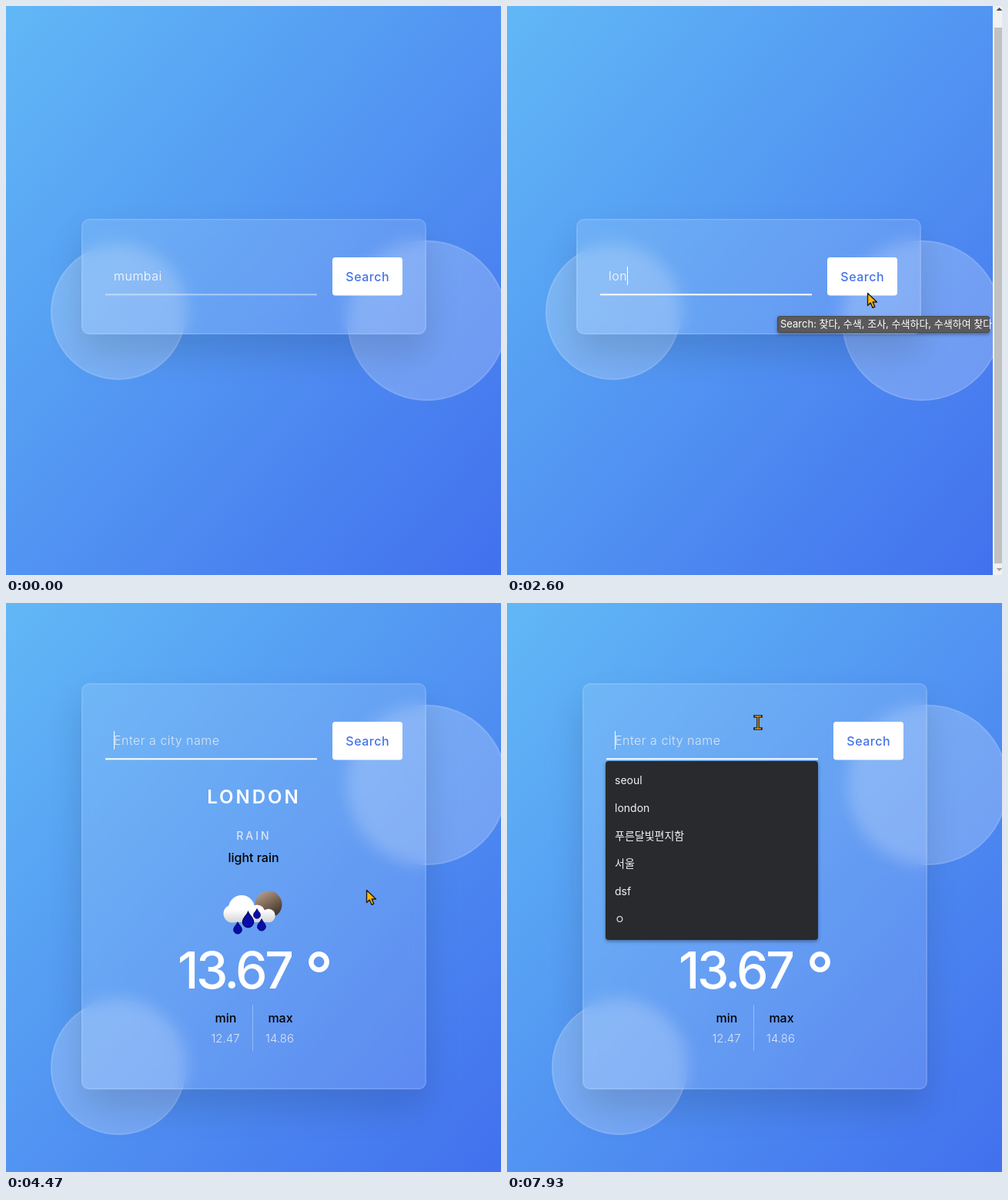
Write an HTML page that moves like this. It is 643 by 738 pixels and loops after 8 s.

```html
<!DOCTYPE html>
<html lang="en">
<head>
<meta charset="utf-8">
<title>Weather search</title>
<style>
  html, body { margin: 0; width: 100%; height: 100%; overflow: hidden; }
  body { font: 16px Inter, "Noto Sans CJK KR", "Noto Sans CJK", sans-serif; }
  #stage {
    position: relative; width: 643px; height: 738px; overflow: hidden;
    background: linear-gradient(to right bottom, #61b8f6, #4270ee);
  }
  #card { position: absolute; width: 448px; }
  .circle, #glass {
    position: absolute; box-sizing: border-box;
    border: 2px solid rgba(255, 255, 255, .1);
  }
  .circle { border-radius: 50%; background: rgba(255, 255, 255, .22); }
  #small { width: 176px; height: 176px; left: -40px; bottom: -59px; }
  #large { width: 208px; height: 208px; left: 345px; top: 28px; }
  #glass {
    inset: 0; border-radius: 10px;
    background: rgba(255, 255, 255, .12);
    backdrop-filter: blur(10px);
    box-shadow: 0 25px 45px rgba(0, 0, 0, .13);
  }
  svg { position: absolute; width: 643px; height: 738px; overflow: visible; }
  #content { left: -98px; top: -104px; }
  #overlay { left: 0; top: 0; }
  text { fill: #fff; white-space: pre; }
  .mid { text-anchor: middle; }
  .field { font-weight: 300; letter-spacing: .5px; }
  .pale { fill: #dce6f5; }
  .button { font-weight: 500; letter-spacing: .5px; fill: #4573e8; }
  .city { font-size: 24px; font-weight: 600; letter-spacing: 3px; }
  .kind { font-size: 14px; font-weight: 500; letter-spacing: 3px; }
  .dark { fill: #000; font-weight: 500; }
  .degrees { font-size: 66px; font-weight: 500; letter-spacing: -3.5px; }
  .ring { font-size: 80px; font-weight: 500; }
  .limit { font-size: 15px; font-weight: 300; }
  .tip { font-size: 13px; }
  .option { font-size: 14px; fill: #f1f2f4; }
  .shadow { filter: drop-shadow(0 2px 2px rgba(0, 0, 0, .35)); }
</style>
</head>
<body>
<div id="stage">
  <div id="card">
    <div class="circle" id="small"></div>
    <div class="circle" id="large"></div>
    <div id="glass"></div>
    <svg id="content">
      <defs>
        <linearGradient id="sun" x1="0" y1="0" x2=".6" y2="1">
          <stop stop-color="#c0ad9c"/><stop offset=".5" stop-color="#836d5b"/><stop offset="1" stop-color="#40342c"/>
        </linearGradient>
        <linearGradient id="cloud" gradientUnits="userSpaceOnUse" x1="0" y1="380" x2="0" y2="415">
          <stop offset=".5" stop-color="#fff"/><stop offset="1" stop-color="#d2d2d4"/>
        </linearGradient>
        <path id="drop" d="M0-8C1.5-4 6-1 6 3A6 6 0 0 1-6 3C-6-1-1.5-4 0-8Z" fill="#0a0caa" stroke="#04055c"/>
      </defs>
      <rect id="selection" y="166" height="24" fill="#3390ff"/>
      <text id="placeholder" class="field pale" x="140" y="183.5">Enter a city name</text>
      <text id="value" class="field" x="140" y="183.5"></text>
      <rect id="caret" y="166" width="1" height="24" fill="#fff"/>
      <rect id="underline" x="129" y="201.3" width="275" height="2" fill="#fff"/>
      <rect x="424" y="154" width="91" height="49.5" rx="4" fill="#fff"/>
      <text class="button mid" x="469.7" y="184.5">Search</text>
      <g id="weather">
        <text class="city mid" x="322" y="260">LONDON</text>
        <text class="kind pale mid" x="322" y="307">RAIN</text>
        <text class="dark mid" x="321.5" y="335.5">light rain</text>
        <circle cx="341" cy="391" r="17.5" fill="url(#sun)"/>
        <g fill="url(#cloud)">
          <circle cx="306" cy="396" r="17"/><circle cx="294" cy="403" r="11.5"/>
          <circle cx="326" cy="402" r="10.5"/><circle cx="341" cy="405.5" r="8.7"/>
          <rect x="286" y="401" width="62" height="13" rx="6"/>
        </g>
        <use href="#drop" transform="translate(301 421) scale(.9)"/>
        <use href="#drop" transform="translate(314.500 410) scale(1.2)"/>
        <use href="#drop" transform="translate(326 402.500) scale(.75)"/>
        <use href="#drop" transform="translate(332 417) scale(.9)"/>
        <text class="degrees" x="223" y="500">13.67</text>
        <text class="ring mid" x="406.5" y="511">°</text>
        <text class="dark mid" x="285.5" y="544">min</text>
        <text class="dark mid" x="356.5" y="544">max</text>
        <text class="limit pale mid" x="285" y="569.5">12.47</text>
        <text class="limit pale mid" x="355.5" y="569.5">14.86</text>
        <rect x="320" y="521" width="1" height="60" fill="#fff" opacity=".35"/>
      </g>
    </svg>
  </div>
  <svg id="overlay">
    <g id="tooltip">
      <rect class="shadow" x="351.5" y="402.500" width="275" height="21" rx="2.5" fill="#5a5a5c" stroke="#48494c"/>
      <text class="tip" x="355" y="417">Search: 찾다, 수색, 조사, 수색하다, 수색하여 찾다</text>
    </g>
    <g id="dropdown">
      <rect class="shadow" x="128" y="205" width="276" height="232" rx="4" fill="#292a2d"/>
    </g>
    <g id="scrollbar">
      <rect x="631" width="12" height="738" fill="#f1f1f1"/>
      <rect x="633" y="28" width="10" height="695" fill="#c1c1c1"/>
      <path d="M635.500 6 639.500 2 643.500 6Z" fill="#505050"/>
      <path d="M635.500 729 639.500 733 643.500 729Z" fill="#a3a3a3"/>
    </g>
    <path id="arrow" d="M.5.5V16.500L4.200 13 7 19.300 9.800 18 7.200 12H12.500Z" fill="#ffb60a" stroke="#1f1c1a" stroke-width="1.4" stroke-linejoin="round"/>
    <g id="beam" fill="none">
      <path d="M-4-8H4M0-8V8M-4 8H4" stroke="#1f1c1a" stroke-width="3.6" stroke-linecap="square"/>
      <path d="M-4-8H4M0-8V8M-4 8H4" stroke="#d8971c" stroke-width="1.4"/>
    </g>
  </svg>
</div>
<script>
const LOOP = 8000;
const $ = id => document.getElementById(id);

// [time, x, y] of the pointer's hot spot
const pointerPath = [
  [330, 71, 427], [730, 322, 354], [800, 322, 354], [1070, 124, 348],
  [1330, 468, 372], [4470, 468, 372], [5270, 259, 152], [5330, 262, 152],
  [5400, 262, 152], [5670, 308, 198], [5870, 308, 198], [6000, 335, 193],
  [6400, 335, 193], [6930, 583, 246], [7070, 583, 246], [7330, 444, 208],
  [7400, 444, 208], [7730, 319, 155], [7800, 319, 155], [7930, 326, 155]
];
const typed = [
  [0, "mumbai"], [1730, "l"], [2330, "lo"], [2530, "lon"],
  [2870, "lond"], [3000, "londo"], [3130, "london"], [3600, ""]
];
const scrollbarShown = [[2200, 2330], [2400, 2530], [2600, 2870], [2930, 3000], [3070, 3130], [3530, 4470]];
const dropdownShown = [[5470, 5670], [6200, 6470], [7600, LOOP]];
const caretHidden = [[0, 1730], [3600, 4130], [4670, 5200], [7000, 7530]];

const within = (t, spans) => spans.some(([from, to]) => t >= from && t < to);
const show = (id, on) => { $(id).style.display = on ? "" : "none"; };

["seoul", "london", "푸른달빛편지함", "서울", "dsf", "ㅇ"].forEach((label, i) => {
  const option = document.createElementNS("http://www.w3.org/2000/svg", "text");
  option.setAttribute("class", "option");
  option.setAttribute("x", 140);
  option.setAttribute("y", 235 + 36 * i);
  option.textContent = label;
  $("dropdown").append(option);
});

function pointerAt(t) {
  const next = pointerPath.findIndex(key => key[0] > t);
  if (next < 0) return pointerPath.at(-1).slice(1);
  const [t0, x0, y0] = pointerPath[next - 1], [t1, x1, y1] = pointerPath[next];
  const p = (t - t0) / (t1 - t0), eased = p * p * (3 - 2 * p);
  return [x0 + (x1 - x0) * eased, y0 + (y1 - y0) * eased];
}

function drawPointer(t, cardTop) {
  const visible = t >= pointerPath[0][0];
  const [x, y] = visible ? pointerAt(t) : [0, 0];
  const overField = x > 129 && x < 404 && y > cardTop + 46 && y < cardTop + 99;
  show("arrow", visible && !overField);
  show("beam", visible && overField);
  for (const id of ["arrow", "beam"])
    $(id).setAttribute("transform", `translate(${Math.round(x)} ${Math.round(y)})`);
  return x;
}

function draw(t) {
  const open = t >= 3600, scrollbar = within(t, scrollbarShown);
  const cardTop = open ? 104 : 276;
  $("card").style.cssText =
    `left:${scrollbar ? 90 : 98}px;top:${cardTop}px;height:${open ? 527 : 150}px`;
  show("weather", open);
  show("scrollbar", scrollbar);
  show("tooltip", t >= 1530 && t < 3600);
  show("dropdown", within(t, dropdownShown));

  const text = typed.findLast(([start]) => t >= start)[1];
  $("value").textContent = text;
  show("placeholder", !text);
  const end = 140 + (text ? $("value").getComputedTextLength() : 0);
  $("caret").setAttribute("x", Math.round(end));
  show("caret", !within(t, caretHidden));
  $("underline").setAttribute("opacity", t < 870 ? .45 : 1);

  const pointerX = drawPointer(t, cardTop);
  const from = t < 1070 ? Math.min(end, Math.max(140, pointerX)) : 140;
  show("selection", t >= 870 && t < 1730);
  $("selection").setAttribute("x", from);
  $("selection").setAttribute("width", end - from);
}

// The screen advances 15 times a second, on times rounded to 10 ms.
function tick() {
  const step = Math.floor((performance.now() % LOOP + 4) * 15 / 1000) % 120;
  draw(Math.round(step * 20 / 3) * 10);
  requestAnimationFrame(tick);
}
tick();
</script>
</body>
</html>
```
